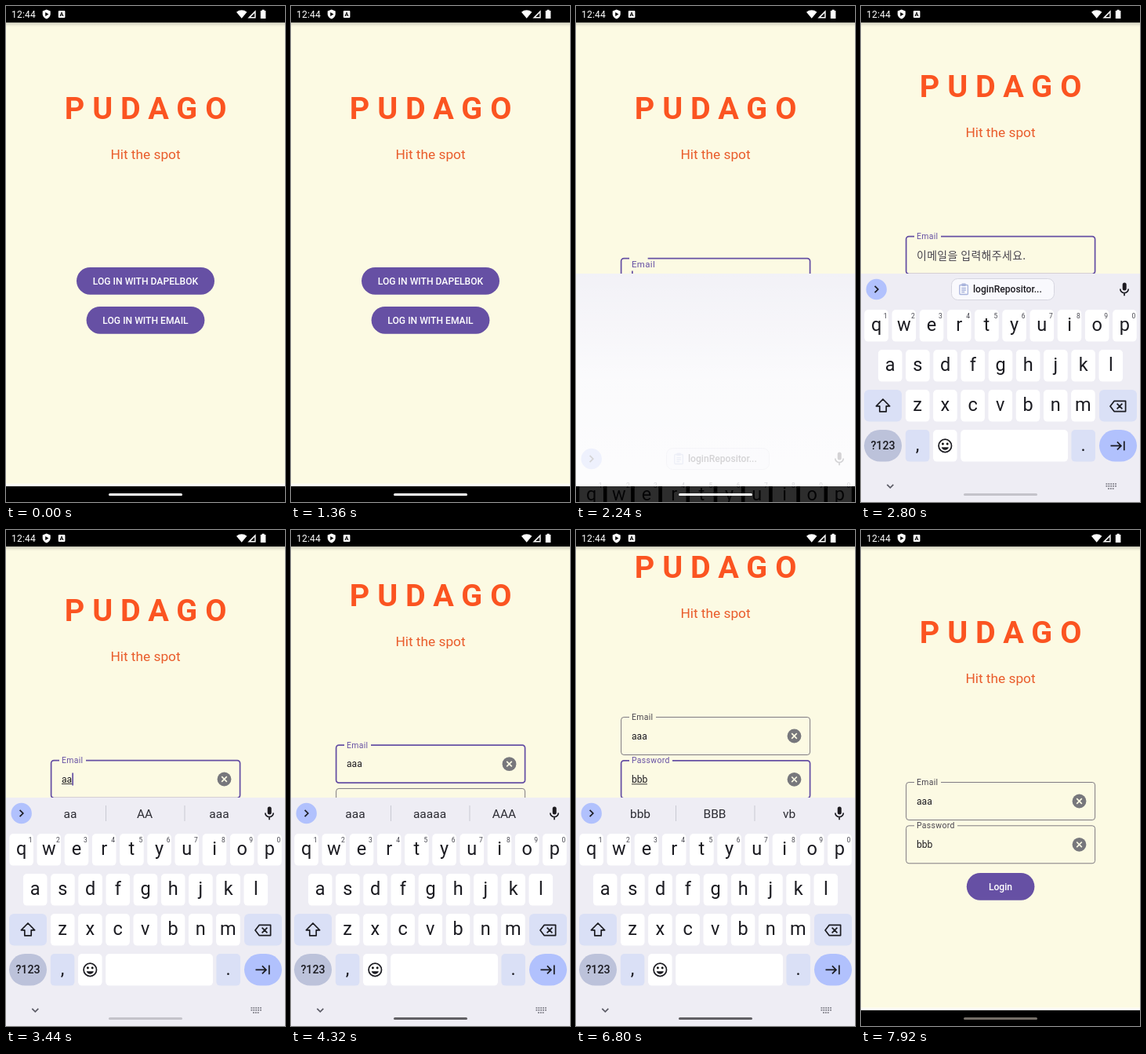
An HTML page for the animation above (8000 ms loop, 356 by 632 pixels).

```html
<!DOCTYPE html>
<html lang="en">
<head>
<meta charset="utf-8">
<title>Login flow</title>
<style>
  html, body { margin: 0; width: 100%; height: 100%; overflow: hidden; background: #000; }
  svg { display: block; width: 100vw; height: 100vh; }
  text { font-family: Roboto, sans-serif; white-space: pre; }
  .mid { text-anchor: middle; }
  .btn { font-size: 12.12px; font-weight: 500; fill: #fff; text-anchor: middle; }
  .key { font-size: 23.5px; fill: #1b1b21; text-anchor: middle; }
  .hint { font-family: "Noto Sans CJK KR", "Noto Sans CJK", sans-serif; font-size: 13.86px; letter-spacing: .43px; fill: #49454f; }
  .line { fill: none; stroke: #1b1b21; stroke-width: 1.7; }
</style>
</head>
<body>
<svg id="stage" viewBox="0 0 356 632" xmlns="http://www.w3.org/2000/svg"></svg>
<script>
const LOOP = 8000, STEP = 80;
const PURPLE = '#6650a4', INK = '#1d1b20', KB = '#eeedf4', ACCENT = '#b1c1fd', SOFT = '#dae0f6';

const clamp = v => Math.max(0, Math.min(1, v));
const ramp = (t, a, b) => clamp((t - a) / (b - a));
const mix = (a, b, p) => a + (b - a) * p;
const smooth = p => p * p * (3 - 2 * p);
const easeOut = p => 1 - (1 - p) ** 3;
const mixRgb = (a, b, p) => `rgb(${a.map((v, i) => Math.round(mix(v, b[i], p)))})`;

const box = (x, y, w, h, r, fill, more = '') =>
  `<rect x="${x}" y="${y}" width="${w}" height="${h}" rx="${r}" fill="${fill}" ${more}/>`;
const label = (x, y, s, attrs = '') => `<text x="${x}" y="${y}" ${attrs}>${s}</text>`;
const button = (x, y, w, s, id = '') =>
  box(x, y, w, 34.7, 17.35, PURPLE, id && `id="${id}"`) + label(178, y + 21.8, s, 'class="btn"');

// Keyboard
const KEY_W = 30.6, KEY_H = 40.6, PITCH = 35.2;
const ROWS = [['qwertyuiop', 19.6, 387], ['asdfghjkl', 37.2, 438], ['zxcvbnm', 72.2, 489]];
const keyPos = {};

function letterRows() {
  return ROWS.map(([chars, x0, y], row) => [...chars].map((c, i) => {
    const x = x0 + i * PITCH;
    keyPos[c] = { x, y };
    return box(x - KEY_W / 2, y, KEY_W, KEY_H, 5, '#fff') + label(x, y + 27, c, 'class="key"') +
      (row ? '' : label(x + 11.5, y + 10.5, (i + 1) % 10, 'class="mid" font-size="8.5" fill="#46464f"'));
  }).join('')).join('');
}

function keyboard() {
  return `
  <circle cx="19.7" cy="361" r="13.2" fill="${ACCENT}"/>
  <path class="line" d="M17.6 356.8l4.2 4.2-4.2 4.2"/>
  <g id="chip">
    ${box(115.5, 347.5, 131, 27, 8, '#f9f9fd', 'stroke="#d6d6e0"')}
    <g fill="none" stroke="#a9b4dc" stroke-width="1.3">
      <rect x="125.8" y="355.5" width="10.6" height="12" rx="1"/>
      <path d="M128.3 359.5h5.6M128.3 362h5.6M128.3 364.5h4"/>
    </g>
    ${box(128.4, 353.6, 5.4, 3.4, 1, '#a9b4dc')}
    ${label(143, 365.2, 'loginRepositor...', `font-size="12.1" font-weight="500" fill="${INK}"`)}
  </g>
  <g id="words">
    <path d="M127.5 351v20M228 351v20" stroke="#c9c9d2"/>
    ${[82, 177, 272].map((x, i) => label(x, 366.6, '', `id="word${i}" class="mid" font-size="15.5" fill="#2c2c33"`)).join('')}
  </g>
  ${box(333.7, 352.5, 5, 10, 2.5, INK)}
  <path class="line" d="M330.8 360.4a5.2 5.2 0 0 0 10.4 0M336 365.6v3.6" stroke-width="1.5"/>
  ${letterRows()}
  ${box(4, 489, 48, KEY_H, 6, SOFT)}
  <path class="line" d="M28 501l8.6 8.8h-4.4v7h-8.4v-7h-4.4z" stroke-linejoin="round"/>
  ${box(304, 489, 48, KEY_H, 6, SOFT)}
  <path class="line" d="M323 503.4h14.6v13.2H323l-5-6.6zM326.6 506.6l6.8 6.8m0-6.8l-6.8 6.8" stroke-linejoin="round"/>
  ${box(4, 540, 48, KEY_H, 20.3, '#bcc2da')}
  ${label(28, 565.3, '?123', 'class="mid" font-size="14.2" font-weight="500" fill="#1b1b21"')}
  ${box(56.8, 540, KEY_W, KEY_H, 5, SOFT)}${label(72.1, 567, ',', 'class="key"')}
  ${box(92, 540, KEY_W, KEY_H, 5, '#fff')}
  <circle class="line" cx="107.3" cy="560.4" r="8.2"/>
  <circle cx="104.4" cy="558" r="1.4"/><circle cx="110.2" cy="558" r="1.4"/>
  <path d="M102.7 562.2h9.2a4.8 4.8 0 0 1-9.2 0z" fill="#1b1b21"/>
  ${box(127.2, 540, 136.8, KEY_H, 5, '#fff')}
  ${box(268.4, 540, KEY_W, KEY_H, 5, SOFT)}${label(283.7, 567, '.', 'class="key"')}
  ${box(304, 540, 48, KEY_H, 20.3, ACCENT, 'id="next"')}
  <path class="line" d="M318.5 560.4h13.4m-5-5l5 5-5 5M335.8 554.6v11.6"/>
  <path class="line" d="M33.3 609.8l4 4 4-4" stroke-width="1.3" style="stroke:#5c5c66"/>
  <path d="M312.5 609h13.5M312.5 611.8h13.5M315 615h8.5" stroke="#6c6c76" stroke-width="1.6" stroke-dasharray="1.8 1.1"/>
  <g id="press">
    ${box(-KEY_W / 2, 0, KEY_W, KEY_H, 5, SOFT)}
    ${box(-KEY_W / 2 - 3, -50, KEY_W + 6, 46, 8, '#fff')}
    <text id="pressChar" class="key" y="-19"></text>
  </g>`;
}

// Text fields
const field = (id, name, hint) => `<g id="${id}">
  <path id="${id}Edge" fill="none"/>
  ${label(71, 0, name, `id="${id}Name" letter-spacing=".35"`)}
  <text id="${id}Hint" class="hint" x="71">${hint}</text>
  <text id="${id}Text" x="71" font-size="12.12" fill="${INK}"></text>
  <path id="${id}Under" stroke="${INK}" stroke-width=".9"/>
  <g id="${id}Clear"><circle r="8.9" fill="#77777c"/>
    <path d="M-3.3-3.3l6.6 6.6m0-6.6l-6.6 6.6" stroke="#fcfae4" stroke-width="1.7"/></g>
  <rect id="${id}Caret" width="1.7" height="16" fill="${PURPLE}"/>
</g>`;

const stage = document.getElementById('stage');
stage.innerHTML = `
<defs>
  <linearGradient id="shade" x2="0" y2="1"><stop stop-color="#8d8c84" stop-opacity=".5"/><stop offset="1" stop-color="#fcfae3" stop-opacity="0"/></linearGradient>
  <linearGradient id="veil" x2="0" y2="1"><stop stop-color="#fff" stop-opacity=".25"/><stop offset=".5" stop-color="#fff" stop-opacity=".75"/><stop offset="1" stop-color="#fff" stop-opacity=".85"/></linearGradient>
</defs>
${box(0, 0, 356, 632, 0, '#fcfae3')}
<g id="page">
  ${label(74.8, 144.3, 'PUDAGO', 'font-size="39.5" font-weight="700" letter-spacing="9.9" fill="#fb5421"')}
  ${label(178, 195.3, 'Hit the spot', 'class="mid" font-size="17.3" fill="#e95c2b"')}
  <g id="home">
    ${button(90, 333, 176, 'LOG IN WITH DAPELBOK')}
    ${button(102.6, 383, 150.8, 'LOG IN WITH EMAIL', 'emailBtn')}
  </g>
  <g id="form">
    ${field('mail', 'Email', '이메일을 입력해주세요.')}
    ${field('pass', 'Password', '비밀번호를 입력해주세요.')}
    ${button(134.8, 437, 86.6, 'Login')}
  </g>
</g>
${box(0, 608.5, 356, 3.5, 0, '#fffef8')}
${box(0, 21, 356, 7, 0, 'url(#shade)')}
${box(0, 0, 356, 21, 0, '#000')}
${label(7, 14.8, '12:44', 'font-size="12" fill="#fff" letter-spacing=".2"')}
<path d="M51.7 4.6l5 1.9v3.7c0 3-2 5.2-5 6.4-3-1.2-5-3.4-5-6.4V6.500z" fill="#fff"/>
<path d="M50.2 7.900l4.200 2.500-4.200 2.500z"/>
${box(66.8, 6, 8.6, 9, 1, '#fff')}${label(71.1, 13.2, 'A', 'class="mid" font-size="7.5" font-weight="700"')}
<path d="M294 7.700a10.300 10.300 0 0 1 13.400 0l-6.700 8z" fill="#fff"/>
<path d="M318.600 5.200v10.200h-10.200z" fill="#fff"/><path d="M317.200 9v5h-5z"/>
<path d="M324.800 6h1.700V4.800h3.200V6h1.700v10h-6.600z" fill="#fff"/>
${box(0, 612, 356, 20, 0, '#000')}
<g id="kb">
  <rect id="kbBack" y="341" width="356" fill="${KB}"/>
  <rect id="kbVeil" y="341" width="356" height="271" fill="url(#veil)"/>
  <g id="keys">${keyboard()}</g>
</g>
${box(131, 621, 94, 3, 1.5, '#fff', 'id="pill"')}`;

const el = {};
stage.querySelectorAll('[id]').forEach(n => el[n.id] = n);
const set = (id, attrs) => { for (const k in attrs) el[id].setAttribute(k, attrs[k]); };
const show = (id, on) => set(id, { opacity: +on });

const mailTaps = [3040, 3280, 3520], passTaps = [4960, 5120, 5260];
const WORDS = {
  a: ['a', 'A', 'as'], aa: ['aa', 'AA', 'aaa'], aaa: ['aaa', 'aaaaa', 'AAA'],
  b: ['b', 'B', 'be'], bb: ['bb', 'BB', 'bbb'], bbb: ['bbb', 'BBB', 'vb']
};
const typed = (t, taps, c) => c.repeat(taps.filter(k => t >= k).length);
const blink = (t, start, taps) => {
  const last = Math.max(start, ...taps.filter(k => t >= k));
  return (t - last) % 1000 < 500;
};

function drawField(id, top, gapFull, s) {
  const { lift, focus, text, caret, composing } = s;
  const x0 = 57.6, x1 = 298.6, bottom = top + 48, r = 3.5, gap = gapFull * lift, mid = top + 24;
  const color = focus ? PURPLE : '#79747e';
  const from = 68 + gap, arc = `a${r} ${r} 0 0 1`;
  set(id + 'Edge', {
    d: `M${from} ${top}H${x1 - r}${arc} ${r} ${r}V${bottom - r}${arc} ${-r} ${r}H${x0 + r}${arc} ${-r} ${-r}V${top + r}${arc} ${r} ${-r}H68`,
    stroke: color, 'stroke-width': focus ? 1.75 : 0.95
  });
  set(id + 'Name', {
    y: mix(mid + 5, top + 3.5, lift), 'font-size': mix(13.86, 10.4, lift), fill: focus ? PURPLE : '#49454f'
  });
  set(id + 'Hint', { y: mid + 5.3 });
  show(id + 'Hint', focus && !text && lift === 1);
  set(id + 'Text', { y: mid + 4.3 });
  el[id + 'Text'].textContent = text;
  const end = 71 + text.length * 6.65;
  set(id + 'Under', { d: `M71 ${mid + 6}H${end}` });
  show(id + 'Under', composing && text);
  set(id + 'Clear', { transform: `translate(278.5 ${mid})` });
  show(id + 'Clear', !!text);
  set(id + 'Caret', { x: end, y: mid - 8 });
  show(id + 'Caret', focus && caret);
}

function update(t) {
  // Screen change after the tap
  const swap = smooth(ramp(t, 1400, 1760));
  set('home', { opacity: 1 - swap });
  set('form', { opacity: swap });
  set('emailBtn', { fill: mixRgb([102, 80, 164], [128, 108, 184], ramp(t, 1360, 1520)) });

  // Page scroll
  const up = 28 * smooth(ramp(t, 2400, 2760)) + 55 * smooth(ramp(t, 4240, 4440));
  set('page', { transform: `translate(0 ${-up * (1 - smooth(ramp(t, 7540, 7900)))})` });

  // Fields
  const mailFocus = t >= 2240 && t < 4400, passFocus = t >= 4400 && t < 7680;
  const mail = typed(t, mailTaps, 'a'), pass = typed(t, passTaps, 'b');
  drawField('mail', 321.5, 34, {
    lift: ramp(t, 2160, 2275), focus: mailFocus, text: mail,
    caret: blink(t, 2240, mailTaps), composing: t < 4240
  });
  drawField('pass', 376.8, 55, {
    lift: ramp(t, 4320, 4460), focus: passFocus, text: pass,
    caret: blink(t, 4400, passTaps), composing: t < 7600
  });

  // Keyboard slide
  const rise = easeOut(ramp(t, 2240, 2560)), drop = smooth(ramp(t, 7520, 7840));
  const open = t >= 2240 && drop < 1;
  el.kb.style.display = open ? '' : 'none';
  set('kb', { transform: `translate(0 ${291 * drop})` });
  set('kbBack', { height: rise > 0.3 ? 291 : 271 });
  set('kbVeil', { opacity: 1 - rise });
  set('keys', { transform: `translate(0 ${216 * (1 - rise)})`, opacity: mix(0.18, 1, rise) });

  // Suggestions
  const words = WORDS[t < 4400 ? mail : pass];
  show('chip', !words);
  show('words', !!words);
  if (words) words.forEach((w, i) => el['word' + i].textContent = w);

  // Key presses
  const hit = taps => taps.some(k => t >= k - 40 && t < k + 80);
  const c = hit(mailTaps) ? 'a' : hit(passTaps) ? 'b' : '';
  show('press', !!c);
  if (c) {
    set('press', { transform: `translate(${keyPos[c].x} ${keyPos[c].y})` });
    el.pressChar.textContent = c;
  }
  set('next', { fill: t >= 4160 && t < 4320 ? '#9dafec' : ACCENT });

  // Home indicator
  const onLight = rise > 0.3 && t >= 2240;
  set('pill', {
    fill: t >= 7680 ? '#746e67' : onLight ? mixRgb([196, 195, 202], [97, 96, 100], ramp(t, 3440, 4160)) : '#fff'
  });
}

function frame(now) {
  update(Math.floor((now % LOOP) / STEP) * STEP);
  requestAnimationFrame(frame);
}
update(0);
requestAnimationFrame(frame);
</script>
</body>
</html>
```
